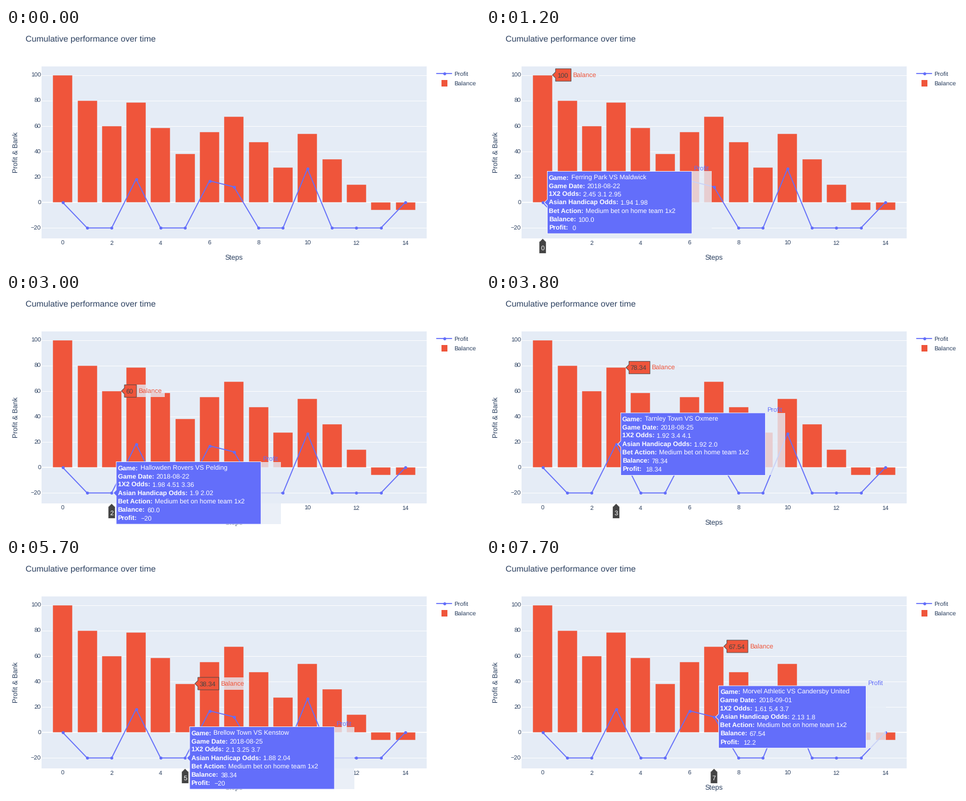
Animation, 800 px wide and 401 px high, one loop 8000 ms. Source, as a matplotlib script:

```python
from itertools import count

import matplotlib.pyplot as plt
from matplotlib.animation import FuncAnimation
from matplotlib.patches import Polygon, Rectangle

plt.rcParams["font.family"] = "Liberation Sans"
plt.rcParams["text.hinting"] = "none"

W, H, DPI = 800, 401, 64
PT = 72 / DPI  # points per pixel
INTERVAL, LOOP = 100, 8000

RED, BLUE, PLOT_BG = "#EF553B", "#636EFA", "#E5ECF6"
INK, DARK, WHITE = "#2A3F5F", "#444444", "#FFFFFF"
TICK, LABEL, HOVER, TITLE = 10.2, 11.9, 11, 14.4  # font sizes in pixels

BALANCE = [100, 80, 60, 78.34, 58.34, 38.34, 55.34, 67.54,
           47.54, 27.54, 53.94, 33.94, 13.94, -6.06, -6.06]
PROFIT = [0, -20, -20, 18.34, -20, -20, 17, 12.2,
          -20, -20, 26.4, -20, -20, -20, 0]

# game, date, 1X2 odds, handicap odds
GAMES = [
    ("Ferring Park VS Maldwick", "2018-08-22", "2.45 3.1 2.95", "1.94 1.98"),
    ("Olden Vale VS Larnwick", "2018-08-22", "2.62 2.77 3.53", "1.86 2.06"),
    ("Hallowden Rovers VS Pelding", "2018-08-22", "1.98 4.51 3.36", "1.9 2.02"),
    ("Tarnley Town VS Oxmere", "2018-08-25", "1.92 3.4 4.1", "1.92 2.0"),
    ("Marwith City VS Dunby United", "2018-08-25", "2.62 2.77 3.6", "1.92 2.02"),
    ("Brellow Town VS Kenstow", "2018-08-25", "2.1 3.25 3.7", "1.88 2.04"),
    ("Gloria de Valmoraes VS Mondira", "2018-08-31", "1.85 4.35 3.3", "1.96 1.96"),
    ("Morvel Athletic VS Candersby United", "2018-09-01", "1.61 5.4 3.7", "2.13 1.8"),
]
STARTS = [1000, 1600, 3000, 3800, 4700, 5700, 6600, 7700]

fig = plt.figure(figsize=(W / DPI, H / DPI), dpi=DPI, facecolor=WHITE)
ax = fig.add_axes([0, 0, 1, 1])
ax.set(xlim=(0, W), ylim=(H, 0))
ax.axis("off")
layer = count(1)


def px(step):
    return 95.7 + 41.31 * step


def py(value):
    return 295.2 - 2.157 * value


def number(value):
    return f"{value:g}".replace("-", "\u2212")


def rect(x, y, w, h, color, alpha=1, edge="none", lw=0):
    return ax.add_patch(Rectangle((x, y), w, h, fc=color, ec=edge, lw=lw * PT,
                                  alpha=alpha, zorder=next(layer)))


def poly(points, color, edge):
    return ax.add_patch(Polygon(points, fc=color, ec=edge, lw=0.85 * PT,
                                joinstyle="miter", zorder=next(layer)))


def line(xs, ys, color, width, **style):
    return ax.plot(xs, ys, color=color, lw=width * PT, zorder=next(layer), **style)[0]


def text(x, y, s, size, color=INK, ha="left", weight="normal"):
    """Text whose capitals are centred on y."""
    return ax.text(x, y + 0.36 * size, s, size=size * PT, color=color, ha=ha,
                   va="baseline", weight=weight, zorder=next(layer))


def width(label):
    return label.get_window_extent().width


def profit_line(xs, ys):
    line(xs, ys, BLUE, 1.7, marker="o", ms=5.1 * PT, mew=0)


def draw_chart():
    rect(60, 65, 650, 291, PLOT_BG)
    for value in range(-20, 101, 20):
        line([60, 710], [py(value)] * 2, WHITE, 1.7 if value == 0 else 0.85)
        text(59, py(value), number(value), TICK, ha="right")
    for step, value in enumerate(BALANCE):
        top, bottom = sorted((py(value), py(0)))
        rect(px(step) - 16.5, top, 33, bottom - top, RED, edge=PLOT_BG, lw=0.45)
    profit_line([px(i) for i in range(15)], [py(v) for v in PROFIT])
    for step in range(0, 15, 2):
        text(px(step), 363.7, str(step), TICK, ha="center")

    text(33, 18, "Cumulative performance over time", TITLE)
    text(385, 387.7, "Steps", LABEL, ha="center")
    ax.text(16.5, 210.5, "Profit & Bank", size=LABEL * PT, color=INK, rotation=90,
            ha="center", va="center")

    line([727, 752.4], [77.2, 77.2], BLUE, 1.7)
    profit_line([739.7], [77.2])
    rect(734.6, 88.4, 10.2, 10.2, RED)
    text(756.6, 77.5, "Profit", TICK)
    text(756.6, 93.7, "Balance", TICK)


def callout(tip, y, lines, name, color, ink, pad, name_y):
    """Pointed box of (bold, plain) lines with the trace name beside it."""
    left, pitch = tip + 5.1, 14.25
    half = pitch * len(lines) / 2 + (2.9 if len(lines) > 1 else 3.4)
    labels, widest = [], 0
    for k, (bold, plain) in enumerate(lines):
        x, row = left + 2.6, y + pitch * (k - (len(lines) - 1) / 2)
        if bold:
            head = text(x, row, bold, HOVER, ink, weight="bold")
            labels.append(head)
            gaps = len(plain) - len(plain.lstrip())
            x += width(head) + 0.6 + gaps * 0.278 * HOVER
        tail = text(x, row, plain.lstrip(), HOVER, ink)
        labels.append(tail)
        widest = max(widest, x + width(tail) - left - 2.6)
    right = left + widest + pad

    tag = text(right + 2.7, name_y, name, HOVER, color)
    back = rect(right, y - half, width(tag) + 8, 2 * half, PLOT_BG, alpha=0.8)
    box = poly([(tip, y), (left, y + 5.1), (left, y + half), (right, y + half),
                (right, y - half), (left, y - half), (left, y - 5.1)], color, ink)
    for label in labels + [tag]:
        label.set_zorder(next(layer))
    return labels + [tag, back, box]


def axis_callout(step):
    x, top, half = px(step), 356, 6
    box = poly([(x, top), (x + 5.1, top + 5.1), (x + half, top + 5.1),
                (x + half, top + 25.6), (x - half, top + 25.6),
                (x - half, top + 5.1), (x - 5.1, top + 5.1)], DARK, WHITE)
    return [box, text(x, top + 15.8, str(step), HOVER, WHITE, ha="center")]


def hover(step):
    game, date, odds, handicap = GAMES[step]
    balance, profit = BALANCE[step], PROFIT[step]
    action = "Medium bet on home team 1x2"
    details = [("Game:", " " + game), ("Game Date:", " " + date),
               ("1X2 Odds:", " " + odds), ("Asian Handicap Odds:", " " + handicap),
               ("Bet Action:", " " + action), ("Balance:", f" {float(balance)}"),
               ("Profit:", "  " + number(profit))]
    x, y_bar, y_dot = px(step), py(balance), py(profit)
    parts = axis_callout(step)
    parts += callout(x + 16.5, y_bar, [("", number(balance))], "Balance",
                     RED, DARK, 8, y_bar)
    parts += callout(x + 2.6, y_dot, details, "Profit", BLUE, WHITE, 30.5, y_dot - 57.3)
    return parts


draw_chart()
hovers = [hover(step) for step in range(len(GAMES))]


def update(frame):
    active = sum(frame * INTERVAL >= start for start in STARTS) - 1
    for step, parts in enumerate(hovers):
        for part in parts:
            part.set_visible(step == active)


anim = FuncAnimation(fig, update, frames=LOOP // INTERVAL, interval=INTERVAL,
                     repeat=True, repeat_delay=0)
plt.show()
```
